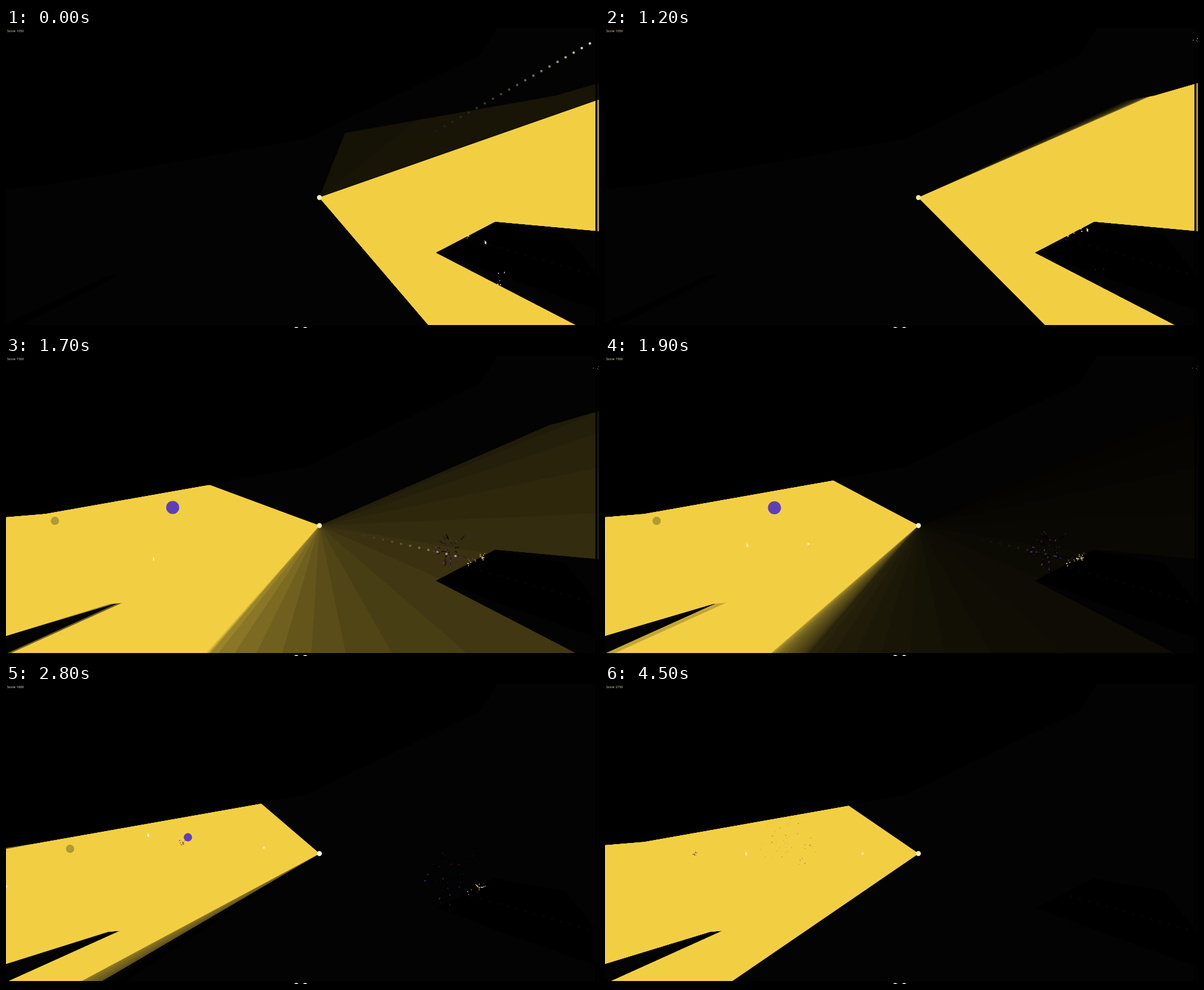
Recreate the animation shown at these times as an HTML page with a canvas. Size 999 by 506 pixels, loop 4600 ms.

```html
<!DOCTYPE html>
<html>
<head>
<meta charset="utf-8">
<style>
  html, body { margin: 0; width: 100%; height: 100%; overflow: hidden; background: #000; }
  canvas { display: block; }
</style>
</head>
<body>
<canvas id="stage" width="999" height="506"></canvas>
<script>
const ctx = document.getElementById('stage').getContext('2d');
const LOOP = 4600, STEP = 100, TICK = 1000 / 60, HISTORY = 34;
const LAMP = { x: 528, y: 286 }, HALF = 34.4, BULLET_SPEED = 0.94;
const YELLOW = [242, 207, 66], PALE = [240, 228, 190], WHITE = [235, 230, 215];
const PURPLE = [95, 63, 184], INK = [45, 36, 50], ROSE = [135, 55, 125], BROWN = [170, 148, 52];

// Turns of the lamp: start, duration, final angle (degrees, clockwise from the right)
const turns = [[-350, 30, 15.1], [100, 500, 9.2], [700, 500, 10.8], [1400, 255, 165],
  [1640, 250, 173.5], [2000, 400, 184], [2650, 100, 186.2], [3700, 500, 180]];

// Shots: time, angle, range
const shots = [[-558, -29.7], [1400, 12.6, 235], [1700, 170.5], [2236, 174], [2700, 186.1], [4400, 180]];

// Hits: time, x, y, particles, reach, points
const hits = [[1300, 750, 326, 30, 52, 450], [2690, 296, 268, 16, 18, 100],
  [3345, 308, 268, 34, 60, 450], [4300, 152, 286, 10, 8, 100]];

const rad = deg => deg * Math.PI / 180;
const clamp = p => Math.max(0, Math.min(1, p));
const ease = p => p < .5 ? 2 * p * p : 1 - 2 * (1 - p) ** 2;
const glow = age => Math.max(0, .905 ** age - .035 * Math.min(1, age / 4));
const shade = (c, k, a = 1) => `rgba(${c.map(v => Math.round(v * k)).join()},${a})`;
const noise = n => { const s = Math.sin(n * 127.1 + 11.7) * 43758.5453; return s - Math.floor(s); };
const aimAt = t => turns.reduce((a, [at, span, to]) => a + (to - a) * ease(clamp((t - at) / span)), -34);

function fillPoly(fill, ...points) {
  ctx.fillStyle = fill;
  ctx.beginPath();
  points.forEach(p => ctx.lineTo(...p));
  ctx.fill();
}

function disc(x, y, r, fill) {
  ctx.fillStyle = fill;
  ctx.beginPath();
  ctx.arc(x, y, r, 0, 2 * Math.PI);
  ctx.fill();
}

function backdrop() {
  ctx.fillStyle = '#000';
  ctx.fillRect(0, 0, 999, 506);
  fillPoly('#030303', [0, 272], [72, 264], [505, 187], [800, 45], [828, 0], [999, 0], [999, 501], [0, 501]);
  fillPoly('#000', [727, 378], [822, 328], [942, 349], [999, 420], [999, 477], [840, 420]);
  fillPoly('#000', [0, 498], [172, 418], [190, 417], [25, 501], [0, 501]);
  for (let i = 0; i < 14; i++) disc(785 + i * 15, 358 + i * 4.3, 1.8, '#070707');
}

function beam(aim, k) {
  // The lit outline shifts a little as the lamp's rays sweep past the corners
  const slip = (aim + 2.6) % 16 * .95, drop = Math.max(0, aim - 180) * 1.1;
  ctx.save();
  fillPoly('transparent', [0, 272 + drop], [66 - drop * 4.4, 266.4 + drop * .78], [925, 114.4], [999, 93],
    [999, 342.5], [824, 326.5], [723.5, 379], [959, 501], [17 - slip, 501], [205 - slip, 416],
    [183 - slip, 418], [0, 472]);
  ctx.clip();
  ctx.fillStyle = shade(YELLOW, k);
  ctx.beginPath();
  ctx.moveTo(LAMP.x, LAMP.y);
  ctx.arc(LAMP.x, LAMP.y, 900, rad(aim - HALF), rad(aim + HALF));
  ctx.fill();
  ctx.restore();
}

function enemies(t, k) {
  if (t < 1560) return;
  const drift = (t - 1900) * .0233;
  if (t < 3350) disc(285.5 + drift, 256 + drift / 8, 11 - 4 * clamp((t - 2600) / 200), shade(PURPLE, k));
  disc(87 + drift, 278, 7, shade(BROWN, k, .9 * clamp((3300 - t) / 500)));
}

function bullets(t, k) {
  for (const [fired, angle, range = 540] of shots) {
    const d = (t - fired) * BULLET_SPEED;
    if (d < 0 || d > range) continue;
    disc(LAMP.x + d * Math.cos(rad(angle)), LAMP.y + d * Math.sin(rad(angle)), 2.1, shade(PALE, k));
  }
}

function burst(t, k, seed, colors, [at, x, y, count, reach]) {
  const s = (t - at) / 1000;
  if (s < 0 || s > 2) return;
  const spread = reach * (.55 * (1 - Math.exp(-8 * s)) + .3 * s);
  for (let i = 0; i < count; i++) {
    const n = seed * 97 + i * 3, a = noise(n) * 2 * Math.PI;
    const d = spread * (.15 + .85 * noise(n + 1)), size = .7 + noise(n + 2) * .8;
    ctx.fillStyle = shade(colors[i % colors.length], k, clamp(1.1 - s / 2));
    ctx.fillRect(x + d * Math.cos(a) - size / 2, y + d * Math.sin(a) - size / 2, size, size);
  }
}

function sparks(t, k) {
  hits.forEach((hit, i) => burst(t, k, i, [INK, ROSE, PURPLE, INK], hit));
  // Stray shots glancing off the block's upper edge
  for (let i = 0; i < 8; i++) {
    const x = 768 + 38 * noise(i + 5);
    burst(t, k, i + 20, [WHITE, YELLOW], [-300 + i * 340, x, 379 - (x - 724) * .52, 4, 7]);
  }
  burst(t, k, 30, [WHITE], [-900, 838, 428, 8, 34]);
  burst(t, k, 31, [WHITE], [20, 997, 20, 5, 8]);
}

function overlay(t) {
  ctx.fillStyle = '#000';
  ctx.fillRect(993, 0, 3, 506);
  ctx.fillRect(0, 501, 999, 5);
  ctx.fillStyle = 'rgba(0,0,0,.3)';
  ctx.fillRect(996, 0, 3, 506);

  const mix = .72 + .28 * Math.cos(2 * Math.PI * (t - 3100) / LOOP);
  const tint = shade(YELLOW.map(v => v + (255 - v) * mix), 1);
  disc(LAMP.x, LAMP.y, 4.2, tint);
  disc(489, 508.5, 4.3, tint);
  disc(504, 508.5, 4.3, tint);

  // The pointer leads the lamp and swings closer during a fast turn
  const aim = aimAt(t + 55), reach = 290 - 2 * Math.abs(aim - aimAt(t));
  const x = LAMP.x + reach * Math.cos(rad(aim)), y = LAMP.y + reach * Math.sin(rad(aim));
  fillPoly(tint, [x - 1.5, y - 3.5], [x + 2, y + .5], [x + .7, y + .8], [x + 1.4, y + 3], [x + .4, y + 3.3], [x - 1.5, y + 2]);

  const score = hits.reduce((sum, hit) => sum + (t >= hit[0] ? hit[5] : 0), 1050);
  ctx.fillStyle = tint;
  ctx.font = '5.2px "Open Sans", "Noto Sans", sans-serif';
  ctx.fillText('Score: ' + score, 2, 7.4);
}

function draw(t) {
  backdrop();
  // Older ticks are dimmer and lie beneath newer ones
  for (let age = HISTORY; age >= 0; age--) {
    const time = t - age * TICK, k = glow(age);
    if (!k) continue;
    beam(aimAt(time), k);
    enemies(time, k);
    bullets(time, k);
    sparks(time, k);
  }
  overlay(t);
}

let shown = -1;
const start = performance.now();
function loop() {
  const t = Math.floor((performance.now() - start) % LOOP / STEP) * STEP;
  if (t !== shown) draw(shown = t);
  requestAnimationFrame(loop);
}
loop();
</script>
</body>
</html>
```
